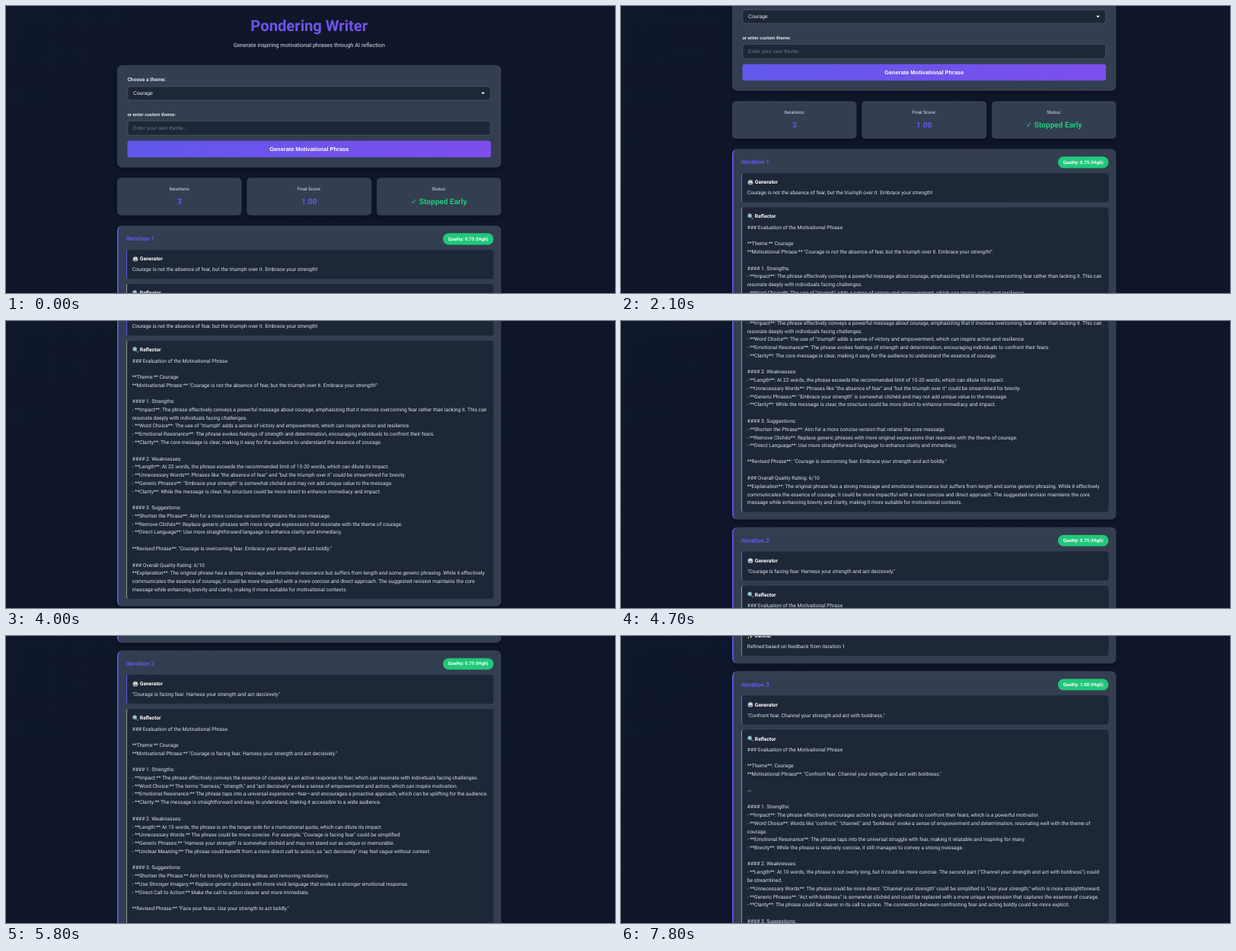
An HTML page for the animation above (8000 ms loop, 800 px wide and 378 px high).

```html
<!DOCTYPE html>
<html lang="en">
<head>
<meta charset="utf-8">
<title>Pondering Writer</title>
<style>
  :root { --indigo: #6158ea; --violet: #7d4eec; --green: #20c87a; --card: #333e50; --inset: #1e2737; }
  * { box-sizing: border-box; margin: 0; }
  html, body { width: 100%; height: 100%; overflow: hidden; }
  body { position: relative; background: linear-gradient(135deg, #0f172a, #10152a); }
  #page {
    position: absolute; left: 146px; top: 0; width: 1200px; padding-top: 24px;
    transform: scale(.42042); transform-origin: 0 0;
    font: 16px/1.6 Roboto, "DejaVu Sans", sans-serif; color: #dbe1e9;
    text-rendering: geometricPrecision;
  }
  header { text-align: center; margin-bottom: 48px; }
  h1 {
    font-size: 48px; line-height: 76.8px; margin-bottom: 8px;
    background: linear-gradient(90deg, var(--indigo), var(--violet));
    -webkit-background-clip: text; background-clip: text; color: transparent;
  }
  header p { font-size: 17.6px; }
  .card { background: var(--card); border-radius: 16px; box-shadow: 0 10px 15px -3px rgba(0, 0, 0, .3); }
  .form { padding: 32px; margin-bottom: 32px; }
  .label { font-weight: 600; margin-bottom: 8px; }
  .small { font-size: 14.4px; margin-top: 32px; }
  .field, .button { font-family: "Liberation Sans", Arial, sans-serif; border-radius: 8px; }
  .field {
    position: relative; height: 45px; line-height: 41px; padding-left: 16px;
    border: 2px solid #4a5565; background: var(--inset); color: #eef1f5;
  }
  .field svg { position: absolute; right: 17px; top: 17px; width: 12px; height: 7px; }
  .empty { height: 47.7px; line-height: 43px; color: #737a85; }
  .button {
    height: 52.2px; margin-top: 16px; line-height: 52px; text-align: center;
    font-size: 17.6px; font-weight: 700; color: #fff;
    background: linear-gradient(135deg, var(--indigo), var(--violet));
  }
  .stats { display: grid; grid-template-columns: repeat(3, 1fr); gap: 16px; margin-bottom: 32px; }
  .stat { padding: 24px; border-radius: 12px; text-align: center; font-size: 14.4px; }
  .stat b { display: block; margin-top: 8px; font-size: 24px; color: var(--indigo); }
  .stat b.ok { color: var(--green); }
  .iteration { padding: 24px; margin-bottom: 24px; border-left: 4px solid var(--indigo); }
  .head { display: flex; align-items: center; justify-content: space-between; height: 36px; }
  h2 { font-size: 19.2px; color: var(--indigo); }
  .pill {
    height: 36px; line-height: 36px; padding: 0 16px; border-radius: 18px;
    background: var(--green); color: #fff; font-size: 14.4px; font-weight: 700;
  }
  .block {
    margin-top: 16px; padding: 16px; border-left: 3px solid var(--indigo);
    border-radius: 8px; background: var(--inset); white-space: pre;
  }
  .reflector { border-color: #8f9399; }
  .refiner { border-color: #1fae73; }
  h3 { font-size: 16px; line-height: 25.6px; margin-bottom: 8px; color: #fff; }
  h3 svg { width: 20px; height: 20px; vertical-align: -4px; }
</style>
</head>
<body>
<div id="page">
  <header>
    <h1>Pondering Writer</h1>
    <p>Generate inspiring motivational phrases through AI reflection</p>
  </header>
  <section class="card form">
    <div class="label">Choose a theme:</div>
    <div class="field">Courage<svg viewBox="0 0 12 7"><path d="M0 0h12L6 7z" fill="#fff"/></svg></div>
    <div class="label small">or enter custom theme:</div>
    <div class="field empty">Enter your own theme...</div>
    <div class="button">Generate Motivational Phrase</div>
  </section>
  <section class="stats">
    <div class="card stat">Iterations:<b>3</b></div>
    <div class="card stat">Final Score:<b>1.00</b></div>
    <div class="card stat">Status:<b class="ok">✓ Stopped Early</b></div>
  </section>
</div>
<script>
const icons = {
  Generator: `<path d="M9 1h2v4H9z" fill="#e0574f"/><rect x="1" y="9" width="18" height="6" rx="2" fill="#c9564e"/>
    <rect x="3" y="4" width="14" height="14" rx="3" fill="#a9bac4"/>
    <circle cx="7" cy="9" r="2" fill="#fff"/><circle cx="13" cy="9" r="2" fill="#fff"/>
    <path d="M6 14h8" stroke="#46545e" stroke-width="2"/>`,
  Reflector: `<path d="M12 12l6 6" stroke="#56646e" stroke-width="4" stroke-linecap="round"/>
    <circle cx="8" cy="8" r="6" fill="#8fc3de" stroke="#8b979f" stroke-width="2"/>`,
  Refiner: `<path d="M12 2l2 6 6 2-6 2-2 7-2-7-6-2 6-2zM4 1l1 3 3 1-3 1-1 3-1-3-3-1 3-1zM4 12l1 3 2 1-2 1-1 2-1-2-2-1 2-1z" fill="#f3e3a0"/>`
};

const iterations = [
  {
    score: '0.75',
    phrase: 'Courage is not the absence of fear, but the triumph over it. Embrace your strength!',
    review: `### Evaluation of the Motivational Phrase

**Theme:** Courage
**Motivational Phrase:** "Courage is not the absence of fear, but the triumph over it. Embrace your strength!"

#### 1. Strengths:
- **Impact**: The phrase effectively conveys a powerful message about courage, emphasizing that it involves overcoming fear rather than lacking it. This can
resonate deeply with individuals facing challenges.
- **Word Choice**: The use of "triumph" adds a sense of victory and empowerment, which can inspire action and resilience.
- **Emotional Resonance**: The phrase evokes feelings of strength and determination, encouraging individuals to confront their fears.
- **Clarity**: The core message is clear, making it easy for the audience to understand the essence of courage.

#### 2. Weaknesses:
- **Length**: At 22 words, the phrase exceeds the recommended limit of 15-20 words, which can dilute its impact.
- **Unnecessary Words**: Phrases like "the absence of fear" and "but the triumph over it" could be streamlined for brevity.
- **Generic Phrases**: "Embrace your strength" is somewhat clichéd and may not add unique value to the message.
- **Clarity**: While the message is clear, the structure could be more direct to enhance immediacy and impact.

#### 3. Suggestions:
- **Shorten the Phrase**: Aim for a more concise version that retains the core message.
- **Remove Clichés**: Replace generic phrases with more original expressions that resonate with the theme of courage.
- **Direct Language**: Use more straightforward language to enhance clarity and immediacy.

**Revised Phrase**: "Courage is overcoming fear. Embrace your strength and act boldly."

### Overall Quality Rating: 6/10
**Explanation**: The original phrase has a strong message and emotional resonance but suffers from length and some generic phrasing. While it effectively
communicates the essence of courage, it could be more impactful with a more concise and direct approach. The suggested revision maintains the core
message while enhancing brevity and clarity, making it more suitable for motivational contexts.`
  },
  {
    score: '0.75',
    phrase: '"Courage is facing fear. Harness your strength and act decisively."',
    review: `### Evaluation of the Motivational Phrase

**Theme:** Courage
**Motivational Phrase:** "Courage is facing fear. Harness your strength and act decisively."

#### 1. Strengths:
- **Impact:** The phrase effectively conveys the essence of courage as an active response to fear, which can resonate with individuals facing challenges.
- **Word Choice:** The terms "harness," "strength," and "act decisively" evoke a sense of empowerment and action, which can inspire motivation.
- **Emotional Resonance:** The phrase taps into a universal experience—fear—and encourages a proactive approach, which can be uplifting for the audience.
- **Clarity:** The message is straightforward and easy to understand, making it accessible to a wide audience.

#### 2. Weaknesses:
- **Length:** At 15 words, the phrase is on the longer side for a motivational quote, which can dilute its impact.
- **Unnecessary Words:** The phrase could be more concise. For example, "Courage is facing fear" could be simplified.
- **Generic Phrases:** "Harness your strength" is somewhat clichéd and may not stand out as unique or memorable.
- **Unclear Meaning:** The phrase could benefit from a more direct call to action, as "act decisively" may feel vague without context.

#### 3. Suggestions:
- **Shorten the Phrase:** Aim for brevity by combining ideas and removing redundancy.
- **Use Stronger Imagery:** Replace generic phrases with more vivid language that evokes a stronger emotional response.
- **Direct Call to Action:** Make the call to action clearer and more immediate.

**Revised Phrase:** "Face your fears. Use your strength to act boldly."

### Overall Quality Rating: 7/10
**Explanation:** The original phrase effectively communicates the theme of courage and has a motivational tone, but it suffers from length and some generic
language. The suggestions for improvement focus on making the phrase more concise and impactful, which would enhance its effectiveness as a
motivational statement. The revised phrase captures the essence of courage in a more direct and memorable way, making it more likely to resonate with the
audience.`,
    refined: 'Refined based on feedback from iteration 1'
  },
  {
    score: '1.00',
    phrase: '"Confront fear. Channel your strength and act with boldness."',
    review: `### Evaluation of the Motivational Phrase

**Theme**: Courage
**Motivational Phrase**: "Confront fear. Channel your strength and act with boldness."

---

#### 1. Strengths:
- **Impact**: The phrase effectively encourages action by urging individuals to confront their fears, which is a powerful motivator.
- **Word Choice**: Words like "confront," "channel," and "boldness" evoke a sense of empowerment and determination, resonating well with the theme of
courage.
- **Emotional Resonance**: The phrase taps into the universal struggle with fear, making it relatable and inspiring for many.
- **Brevity**: While the phrase is relatively concise, it still manages to convey a strong message.

#### 2. Weaknesses:
- **Length**: At 10 words, the phrase is not overly long, but it could be more concise. The second part ("Channel your strength and act with boldness") could
be streamlined.
- **Unnecessary Words**: The phrase could be more direct. "Channel your strength" could be simplified to "Use your strength," which is more straightforward.
- **Generic Phrases**: "Act with boldness" is somewhat clichéd and could be replaced with a more unique expression that captures the essence of courage.
- **Clarity**: The phrase could be clearer in its call to action. The connection between confronting fear and acting boldly could be more explicit.

#### 3. Suggestions:`
  }
];

const block = (role, text) => text ? `<div class="block ${role.toLowerCase()}"><h3><svg viewBox="0 0 20 20">${
  icons[role]}</svg> ${role}</h3>${text}</div>` : '';

const page = document.getElementById('page');
page.insertAdjacentHTML('beforeend', iterations.map((it, i) => `<section class="card iteration">
  <div class="head"><h2>Iteration ${i + 1}</h2><span class="pill">Quality: ${it.score} (High)</span></div>
  ${block('Generator', it.phrase)}${block('Reflector', it.review)}${block('Refiner', it.refined)}
</section>`).join(''));

// Wheel bursts: start in ms, number of 100 ms steps, notches, lag of the first step
const LOOP = 8000, STEP = 100, NOTCH = 50.5;
const bursts = [
  [1200, 4, 1, .6], [1900, 3, 1, .6], [2500, 3, 1, .6], [3100, 4, 2, .53],
  [3700, 5, 2, .6], [4400, 4, 2, .6], [5000, 3, 2, .6], [5600, 3, 3, .7],
  [6200, 4, 3, .7], [6800, 3, 3, .84], [7400, 3, 3, .7]
];
const smooth = u => u * u * (3 - 2 * u);

function scrollAt(t) {
  let y = 0;
  for (const [start, steps, notches, lag] of bursts) {
    if (t < start) break;
    const k = Math.min(steps, Math.floor((t - start) / STEP) + 1);
    y += notches * NOTCH * smooth((k - lag) / (steps - lag));
  }
  return y;
}

function draw() {
  const y = scrollAt(performance.now() % LOOP);
  page.style.transform = `translateY(${-y.toFixed(2)}px) scale(.42042)`;
  requestAnimationFrame(draw);
}
draw();
</script>
</body>
</html>
```
